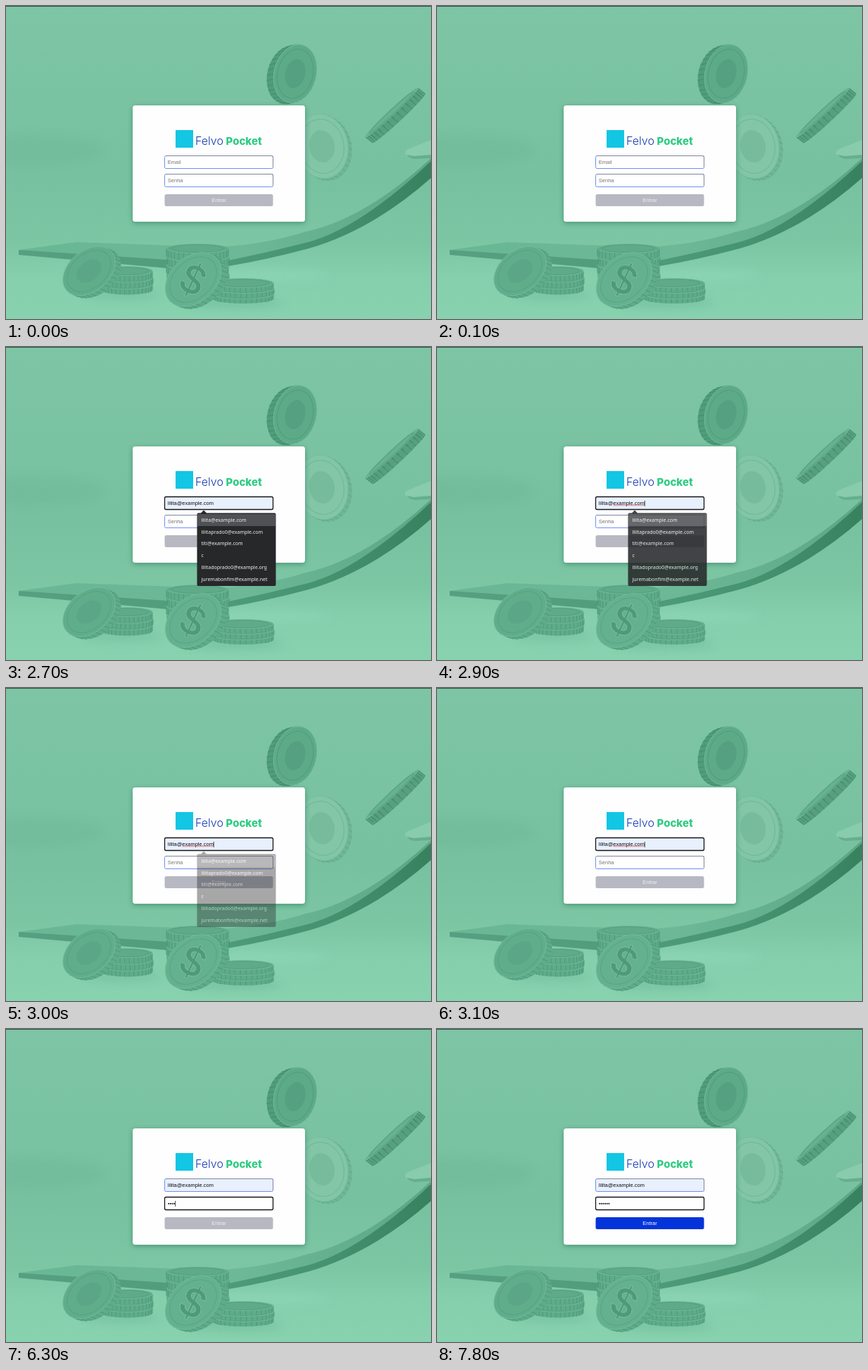
An HTML page that plays this animation: 604x444 px, repeating every 8 s.

```html
<!DOCTYPE html>
<html lang="pt-BR">
<head>
<meta charset="utf-8">
<title>Login</title>
<style>
  html, body { margin: 0; width: 100%; height: 100%; overflow: hidden; background: #7cc4a4; }
  svg { display: block; width: 100%; height: 100%; }
  .form text { font: 7.5px "Liberation Sans", Arial, sans-serif; }
  .brand text { font: 300 16px Inter, sans-serif; }
  .brand .bold { font-weight: 800; font-size: 15px; }
  #menu text { font: 7px "Noto Sans", sans-serif; fill: #f1f1f1; }
</style>
</head>
<body>
<svg viewBox="0 0 604 444" preserveAspectRatio="none">
  <defs>
    <linearGradient id="wall" x2="0" y2="1">
      <stop stop-color="#7dc5a5"/><stop offset=".55" stop-color="#78c1a0"/>
      <stop offset=".76" stop-color="#7cc6a4"/><stop offset=".86" stop-color="#85cfad"/><stop offset="1" stop-color="#88d2b0"/>
    </linearGradient>
    <linearGradient id="rampTop">
      <stop stop-color="#69b795"/><stop offset=".55" stop-color="#6db897"/><stop offset="1" stop-color="#5aa685"/>
    </linearGradient>
    <linearGradient id="rampSide">
      <stop stop-color="#579f80"/><stop offset=".45" stop-color="#4f9d7c"/>
      <stop offset=".75" stop-color="#45926f"/><stop offset="1" stop-color="#38815f"/>
    </linearGradient>
    <filter id="soft" x="-50%" y="-100%" width="200%" height="300%"><feGaussianBlur stdDeviation="7"/></filter>
    <filter id="lift" x="-10%" y="-10%" width="120%" height="125%">
      <feDropShadow dx="0" dy="2" stdDeviation="3.5" flood-color="#1d5a41" flood-opacity=".45"/>
    </filter>
  </defs>

  <rect width="604" height="444" fill="url(#wall)"/>
  <g filter="url(#soft)" fill="#5ba785" opacity=".4">
    <ellipse cx="30" cy="205" rx="110" ry="22" opacity=".4"/>
    <ellipse cx="165" cy="410" rx="55" ry="5"/>
    <ellipse cx="325" cy="421" rx="70" ry="6"/>
  </g>
  <ellipse cx="350" cy="382" rx="110" ry="9" fill="#90d8b7" opacity=".6" filter="url(#soft)"/>
  <path d="M604 190L571 203Q564 207 569 212Q574 217 582 217L604 216Z" fill="#88cbad"/>
  <path d="M569 211Q574 217 582 217L604 216V211L580 213Z" fill="#65af8e"/>
  <path d="M18 346L100 335L300 342Q370 338 426 320Q510 302 604 216V220Q500 318 425 336Q370 350 316 362L230 361L18 347Z" fill="url(#rampTop)"/>
  <path d="M18 346L230 360L316 361Q370 350 425 336Q500 318 604 220V244Q520 318 430 344Q370 360 316 369L230 372L18 353Z" fill="url(#rampSide)"/>
  <g id="coins"></g>
  <rect width="604" height="1" fill="#35574a"/>

  <rect x="180" y="141" width="245" height="165" rx="4" fill="#fefefe" filter="url(#lift)"/>
  <g class="brand">
    <rect x="241" y="176" width="25" height="25" fill="#13c6e3"/>
    <text x="269" y="196.5" fill="#1339b4">Felvo</text>
    <text class="bold" x="312.5" y="196.5" fill="#2fcc82">Pocket</text>
  </g>
  <g class="form">
    <g id="email"></g>
    <g id="password"></g>
    <rect id="button" x="225.5" y="267" width="154" height="17" rx="2.5"/>
    <text id="buttonText" x="302.5" y="278.2" text-anchor="middle">Entrar</text>
  </g>
  <g id="menu"></g>
</svg>

<script>
const $ = id => document.getElementById(id);
const LOOP = 8000;
const ADDRESS = ["lilita@", "example.com"];
const SUGGESTIONS = [
  ADDRESS.join(""), "lilitaprado0@example.com", "titi@example.com",
  "c", "lilitadoprado0@example.org", "juremabonfim@example.net"
];

// A coin is a face plus a ridged side extruded along (dx, dy).
function coin({ x, y, rx, ry, turn = 0, dx = 0, dy = 0, face = "#68b694", side = "#5eac8a", ridge = "#4b9674", mark = "" }) {
  const ellipse = (k, style) => `<ellipse cx="${dx * k}" cy="${dy * k}" rx="${rx}" ry="${ry}" ${style}/>`;
  let body = "";
  for (let k = 4; k >= 0; k--) body += ellipse(k / 4, `fill="${side}"`);
  let ridges = "";
  for (let i = 0; i < 34; i++) {
    const a = i * Math.PI / 17;
    ridges += `M${(rx * Math.cos(a)).toFixed(1)} ${(ry * Math.sin(a)).toFixed(1)}l${dx} ${dy}`;
  }
  const rim = `<ellipse rx="${rx * .84}" ry="${ry * .84}" fill="none" stroke="${ridge}" stroke-opacity=".45"/>`;
  return `<g transform="translate(${x} ${y}) rotate(${turn})">${body}` +
    `<path d="${ridges}" stroke="${ridge}" stroke-width="1.2" opacity=".7"/>` +
    ellipse(0, `fill="${face}" stroke="#78be9e" stroke-width=".8"`) + rim + mark + `</g>`;
}

function stack(x, top, rx, count, step) {
  let out = "";
  for (let i = count - 1; i >= 0; i--)
    out += coin({ x: x + (i % 2 ? 1 : 0), y: top + i * step, rx, ry: 6.5, dy: step - 1.5, face: "#5eaa89" });
  return out;
}

const disc = (rx, ry, fill) => `<ellipse rx="${rx}" ry="${ry}" fill="${fill}"/>`;
const dollar = `<text transform="rotate(67)" text-anchor="middle" y="20" font-family="Inter, sans-serif" font-size="55" font-weight="600" fill="#4e9a7a" stroke="#7dc1a2" stroke-width=".8">$</text>`;

$("coins").innerHTML = [
  coin({ x: 411, y: 96, rx: 30, ry: 42, turn: 14, dx: -9, dy: 4, face: "#5daa89", side: "#509d7c", ridge: "#40896a", mark: disc(14, 21, "#54a080") }),
  coin({ x: 449, y: 199, rx: 37, ry: 46, turn: -10, dx: 5, dy: 4, face: "#82c5a7", side: "#6eb697", ridge: "#5ca585", mark: disc(18, 23, "#76bc9c") }),
  coin({ x: 548, y: 151, rx: 51, ry: 4, turn: -43, dx: 2, dy: 13, face: "#65b190", side: "#589f80", ridge: "#40896a" }),
  stack(172, 376, 36, 3, 9.5),
  coin({ x: 118, y: 376, rx: 42, ry: 29, turn: -40, dx: 4, dy: 8, face: "#60ad8c", mark: disc(20, 14, "#5ba686") }),
  stack(272, 344, 44, 4, 12),
  stack(337, 393, 43, 3, 8),
  coin({ x: 266, y: 388, rx: 45, ry: 32, turn: -42, dx: 4, dy: 8, face: "#64b190", mark: dollar })
].join("");

function field(y, focused, filled, content) {
  const box = (fill, stroke, width) =>
    `<rect x="225.5" y="${y + .5}" width="154" height="18" rx="2" fill="${fill}" stroke="${stroke}" stroke-width="${width}"/>`;
  const fill = filled ? "#e8f0fe" : "#fff";
  if (focused) return box(fill, "#151515", 1.3) + content;
  return box(fill, "#6f8ff5", 1) +
    `<path d="M227 ${y + .5}H377.5q2 0 2 2v14" fill="none" stroke="#80859c"/>` + content;
}

const label = (y, text, color) => `<text x="229.8" y="${y}" fill="${color}">${text}</text>`;
const caret = (x, y) => `<path d="M${x} ${y}v8" stroke="#111" stroke-width=".8"/>`;

// Measure the address once so the caret and spelling mark follow the text.
const pen = document.createElement("canvas").getContext("2d");
pen.font = '75px "Liberation Sans", Arial, sans-serif';
const widthOf = text => pen.measureText(text).width / 10;
const domainX = 229.8 + widthOf(ADDRESS[0]);
const addressEnd = 229.8 + widthOf(ADDRESS.join(""));

function squiggle() {
  let d = `M${domainX} 225`;
  for (let x = domainX, up = true; x < addressEnd - 1; x += 1, up = !up) d += `l1 ${up ? -.8 : .8}`;
  return `<path d="${d}" fill="none" stroke="#e33b3b" stroke-width=".7"/>`;
}

function emailField(t) {
  const focused = t >= 2100 && t < 3700;
  const filled = t >= 2700;
  let content = filled ? label(224.2, ADDRESS.join(""), "#111") : label(224.2, "Email", "#757575");
  if (focused && t < 2600) content += caret(230.2, 218);
  if (focused && t >= 2900) {
    content += squiggle();
    if (t < 3500) content += caret(addressEnd + .3, 218);
  }
  return field(212, focused, filled, content);
}

const KEYS = [5000, 5400, 5900, 6300, 6800, 7200];

function passwordField(t) {
  const focused = t >= 3700;
  const dots = KEYS.filter(key => t >= key).length;
  let content = dots ? "" : label(250.2, "Senha", "#757575");
  for (let i = 0; i < dots; i++) content += `<circle cx="${231.2 + i * 2.63}" cy="247.8" r="1.05" fill="#111"/>`;
  const blinkedOff = (t >= 4300 && t < 4900) || t >= 7800;
  if (focused && !blinkedOff) content += caret(230.2 + dots * 2.63, 243.8);
  return field(238, focused, false, content);
}

$("menu").innerHTML =
  `<path d="M274 235.5h3l4-4 4 4h96.5q2 0 2 2V337q0 2-2 2H273.5q-2 0-2-2V237.5q0-2 2-2Z" fill="#27282a"/>` +
  `<rect id="hover" x="272" y="237" width="111" height="17" fill="#505154"/>` +
  SUGGESTIONS.map((text, i) => `<text x="277.5" y="${248 + i * 16.7}">${text}</text>`).join("");

function menuOpacity(t) {
  if (t < 2100 || t >= 3100) return 0;
  return t < 2900 ? 1 : t < 3000 ? .87 : .4;
}

function draw(now) {
  const t = now % LOOP;
  $("email").innerHTML = emailField(t);
  $("password").innerHTML = passwordField(t);
  const ready = t >= KEYS[5];
  $("button").setAttribute("fill", ready ? "#0434d9" : "#b8b8c3");
  $("buttonText").setAttribute("fill", ready ? "#fff" : "#f0f0f3");
  $("menu").setAttribute("opacity", menuOpacity(t));
  $("hover").setAttribute("opacity", t >= 2600 ? 1 : 0);
  requestAnimationFrame(draw);
}
draw(0);
</script>
</body>
</html>
```
